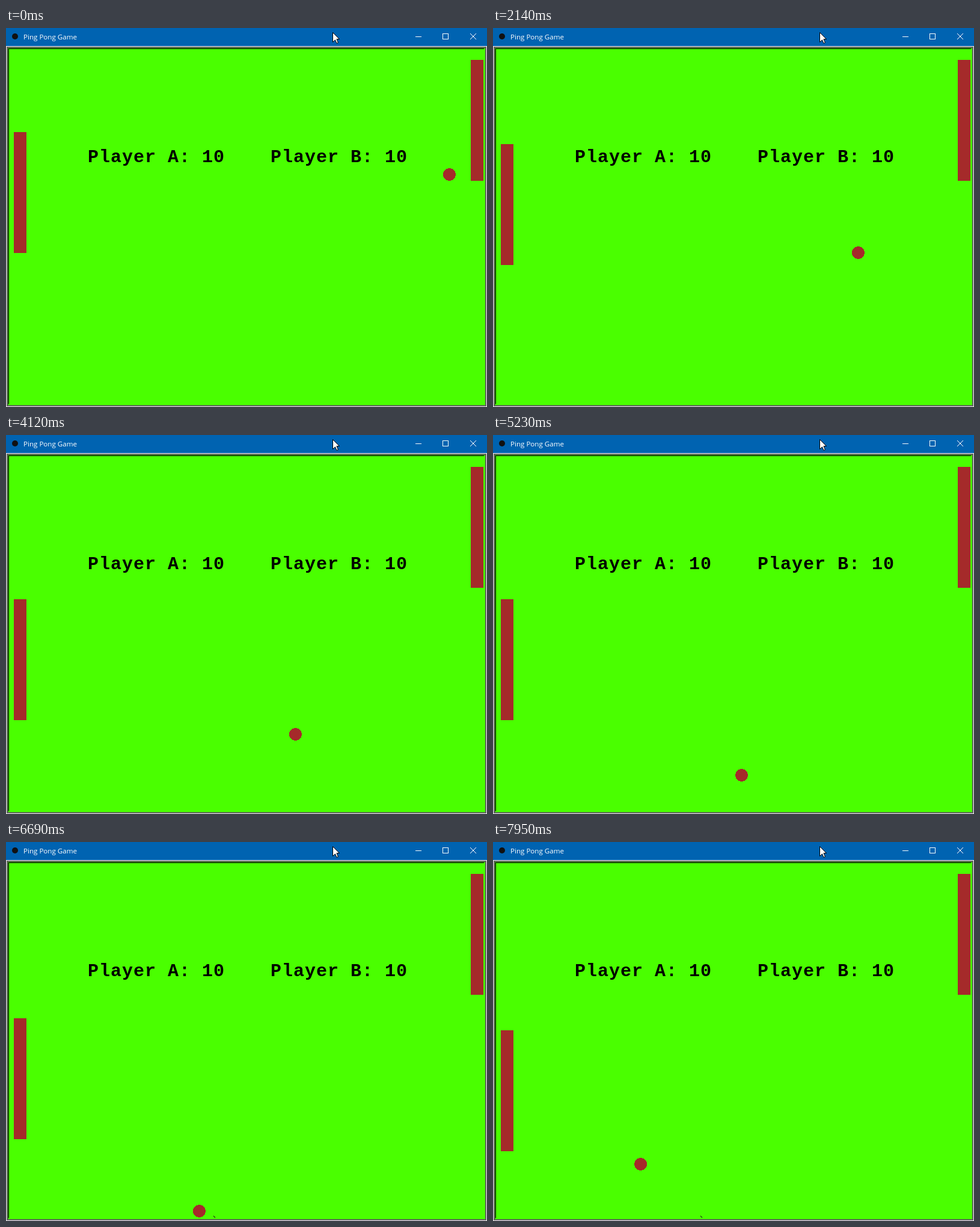
An HTML page for the animation above (8000 ms loop, 800x630 px).

```html
<!DOCTYPE html>
<html lang="en">
<head>
<meta charset="utf-8">
<title>Ping Pong Game</title>
<style>
  html, body { margin: 0; width: 100%; height: 100%; overflow: hidden; }
  svg { display: block; width: 800px; height: 630px; }
  .title { font: 11.6px "Open Sans", sans-serif; fill: #fff; }
  .score { font: bold 30px "Liberation Mono", monospace; letter-spacing: 1px; white-space: pre; }
  .brown { fill: #a52a2a; }
  .icon { fill: none; stroke: #fff; }
  .crisp { shape-rendering: crispEdges; }
</style>
</head>
<body>
<svg viewBox="0 0 800 630">
  <clipPath id="court"><rect x="5" y="35" width="790" height="590"/></clipPath>

  <g class="crisp">
    <rect width="800" height="630" fill="#f0f0f0"/>
    <rect width="800" height="30" fill="#0063b1"/>
    <!-- focus ring and sunken bevel -->
    <rect x="1" y="31" width="798" height="598" fill="#646464"/>
    <rect x="3" y="33" width="794" height="594" fill="#43e600"/>
    <path d="M3 627V33H797L796 34H4V626Z" fill="#2c9900"/>
    <rect x="4" y="34" width="792" height="592" fill="#4aff00"/>
    <path d="M4 34H795V35H5V625H4Z"/>
  </g>

  <circle cx="15" cy="14" r="5" fill="#111"/>
  <text class="title" x="29" y="19">Ping Pong Game</text>
  <path class="icon crisp" d="M681 14.5H691M726.5 9.5H735.5V18.5H726.5Z"/>
  <path class="icon" d="M772 9L782 19M782 9L772 19"/>
  <path d="M543.5 7.5V23.5L547.5 19.8L550 25.5L552.4 24.4L550 18.5H554.5Z" fill="#fff" stroke="#000"/>

  <text class="score" x="136" y="223">Player A: 10    Player B: 10</text>

  <g class="crisp" clip-path="url(#court)">
    <path id="scuff" d="M345 621L348 625" stroke="#2a6010"/>
    <rect class="brown" x="773" y="53" width="21" height="201"/>
    <rect class="brown" id="paddle" x="13" width="21" height="201"/>
    <circle class="brown" id="ball" r="10.5"/>
  </g>
</svg>
<script>
  const LOOP = 8000;
  const STEP_MS = 78, STEP_PX = 4.82;
  const BOUNCE = 392;
  const [ball, paddle, scuff] = ["ball", "paddle", "scuff"].map(id => document.getElementById(id));

  // Key presses so far in a series of evenly spaced ones
  function presses(time, first, gap, count) {
    return Math.max(0, Math.min(count, Math.floor((time - first) / gap) + 1));
  }

  function draw(time) {
    const step = Math.floor(time / STEP_MS + 0.25);
    const distance = Math.round(step * STEP_PX);
    // The ball moves 2 px sideways, then 2 px vertically, in turn.
    const across = 2 * Math.ceil(distance / 2);
    const down = 2 * Math.floor(distance / 2);
    const depth = Math.min(down, 2 * BOUNCE - down);
    ball.setAttribute("cx", 737.5 - across);
    ball.setAttribute("cy", 243.5 + depth);

    const moves = presses(time, 1990, 380, 4) + presses(time, 3760, 1740, 3);
    paddle.setAttribute("y", 173 + 20 * moves);
    scuff.setAttribute("visibility", distance >= BOUNCE ? "visible" : "hidden");
  }

  const begin = performance.now();
  function tick() {
    draw((performance.now() - begin) % LOOP);
    requestAnimationFrame(tick);
  }
  tick();
</script>
</body>
</html>
```
